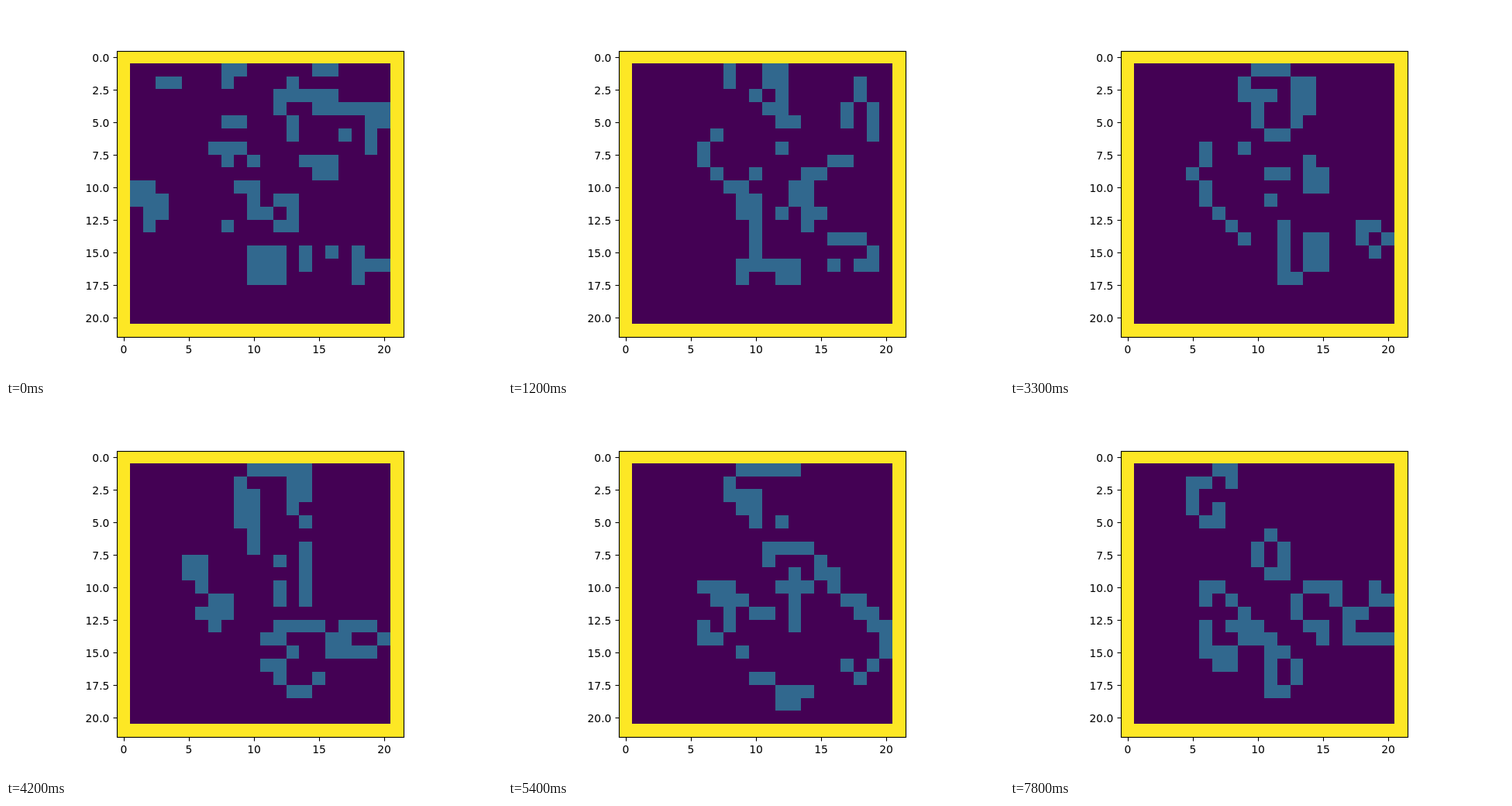
These frames come from a looping animation (640x480 px, 8 s). An HTML page with a canvas:

```html
<!DOCTYPE html>
<html lang="en">
<head>
<meta charset="utf-8">
<title>Game of Life</title>
<style>
  html, body { margin: 0; width: 100%; height: 100%; overflow: hidden; background: #fff; }
  canvas { display: block; }
</style>
</head>
<body>
<canvas id="stage" width="640" height="480"></canvas>
<script>
const ctx = document.getElementById('stage').getContext('2d');
const LOOP = 8000, STEP = 300;
const N = 22;                            // cells per side, wall included
const LEFT = 143, TOP = 57, CELL = 370 / N;

// Live columns of each row, from row 1 down
const SEED = `8-9 15-16
3-4 8 13
12-16
12 15-20
8-9 13 19-20
13 17 19
7-9 19
8 10 14-16
15-16
1-2 9-10
1-3 10 12-13
2-3 10-11 13
2 8 12-13

10-12 14 16 18
10-12 14 18-20
10-12 18`;

const emptyGrid = () => Array.from({ length: N }, () => Array(N).fill(0));

function parse(seed) {
  const grid = emptyGrid();
  seed.split('\n').forEach((line, i) => {
    for (const run of line.split(' ').filter(Boolean)) {
      const [from, to = from] = run.split('-').map(Number);
      grid[i + 1].fill(1, from, to + 1);
    }
  });
  return grid;
}

// Conway's rules; the wall always counts as dead
function evolve(grid) {
  const next = emptyGrid();
  for (let r = 1; r < N - 1; r++) {
    for (let c = 1; c < N - 1; c++) {
      let sum = 0;
      for (let y = r - 1; y <= r + 1; y++)
        for (let x = c - 1; x <= c + 1; x++) sum += grid[y][x];
      next[r][c] = sum === 3 || (sum === 4 && grid[r][c]) ? 1 : 0;
    }
  }
  return next;
}

const generations = [parse(SEED)];
while (generations.length * STEP < LOOP) generations.push(evolve(generations.at(-1)));

function block(c0, r0, c1, r1, color) {
  const px = c => Math.round(LEFT + c * CELL), py = r => Math.round(TOP + r * CELL);
  ctx.fillStyle = color;
  ctx.fillRect(px(c0), py(r0), px(c1) - px(c0), py(r1) - py(r0));
}

function line(x0, y0, x1, y1) {
  ctx.beginPath();
  ctx.moveTo(x0, y0);
  ctx.lineTo(x1, y1);
  ctx.stroke();
}

function drawAxes() {
  ctx.strokeStyle = ctx.fillStyle = '#000';
  ctx.lineWidth = 1.11;
  ctx.strokeRect(143.5, 58.5, 370, 369);
  ctx.font = '13.89px "DejaVu Sans", sans-serif';
  ctx.textAlign = 'center';
  for (let i = 0; i < 5; i++) {
    const x = 152 + 84 * i;
    line(x + 0.5, 427.5, x + 0.5, 432.5);
    ctx.fillText(i * 5, x, 448);
  }
  ctx.textAlign = 'right';
  for (let i = 0; i < 9; i++) {
    const y = 66 + 42 * i;
    line(138.5, y + 0.5, 143.5, y + 0.5);
    ctx.fillText((i * 2.5).toFixed(1), 133.4, y + 6);
  }
}

function draw(grid) {
  ctx.fillStyle = '#fff';
  ctx.fillRect(0, 0, 640, 480);
  block(0, 0, N, N, '#fde725');
  ctx.clearRect(LEFT, TOP, 370, 1);      // plot area starts one pixel lower
  block(1, 1, N - 1, N - 1, '#440154');
  grid.forEach((row, r) => row.forEach((live, c) => {
    if (live) block(c, r, c + 1, r + 1, '#31688e');
  }));
  drawAxes();
}

const start = performance.now();
function frame() {
  const t = (performance.now() - start) % LOOP;
  draw(generations[Math.floor(t / STEP)]);
  requestAnimationFrame(frame);
}
frame();
</script>
</body>
</html>
```
